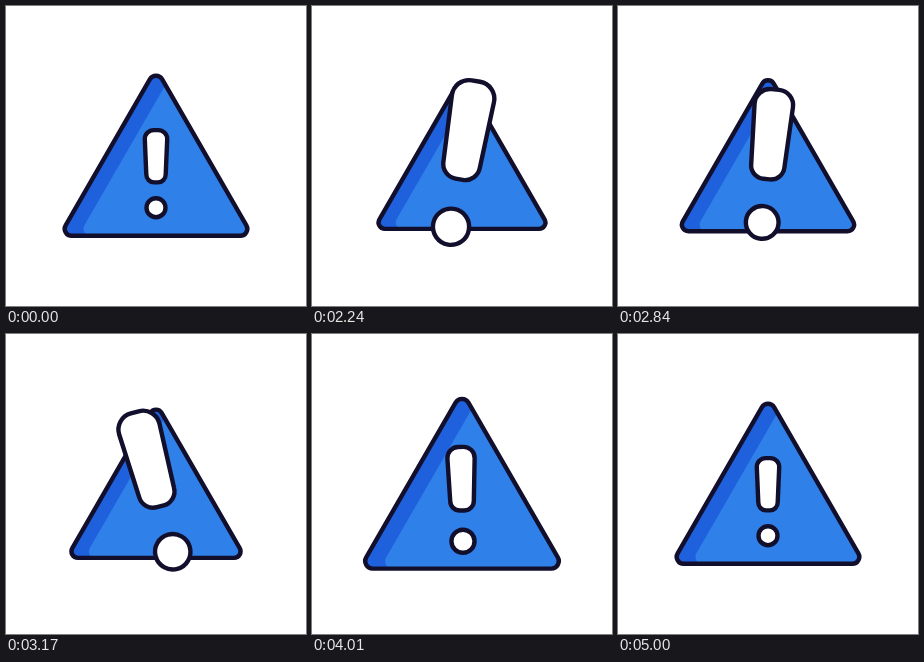
Write an HTML page that moves like this. It is 300 px wide and 300 px high and loops after 5.06 s.

```html
<!DOCTYPE html>
<html lang="en">
<head>
<meta charset="utf-8">
<title>Warning sign</title>
<style>
  html, body { margin: 0; width: 100%; height: 100%; overflow: hidden; background: #fff; }
  svg { display: block; width: 100vw; height: 100vh; }
  path, circle { vector-effect: non-scaling-stroke; }
  .line { stroke: #120f2d; stroke-width: 4.4; stroke-linejoin: round; }

  .sign, .mark {
    --ease: cubic-bezier(.37, 0, .63, 1);
    transform-origin: 0 0;
  }
  .sign { animation: pulse 5060ms var(--ease) infinite; }
  .mark {
    translate: 0 17.5px;
    animation: lift 5060ms var(--ease) infinite,
               swing 5060ms var(--ease) infinite,
               grow 5060ms var(--ease) infinite;
  }

  @keyframes pulse {
    0%, 39.53% { scale: 1; }
    48.02% { scale: .855; }
    57.9%  { scale: .95; }
    71.74% { scale: .86; }
    82.7%  { scale: 1.117; }
    89.72% { scale: .99; }
    98.81%, 100% { scale: 1; }
  }
  @keyframes lift {
    0%, 39.53% { translate: 0 17.5px; }
    47.63% { translate: 0 .3px; }
    57.9%  { translate: 0 8.4px; }
    71.74% { translate: 0 .5px; }
    82.7%  { translate: 0 20px; }
    87.55% { translate: 0 12.5px; }
    92.89% { translate: 0 18.5px; }
    98.81%, 100% { translate: 0 17.5px; }
  }
  @keyframes swing {
    0%, 39.53% { rotate: 0deg; }
    49.01% { rotate: 19.3deg; }
    66.8%, 71.74% { rotate: -20.2deg; }
    82.7%  { rotate: 4deg; }
    87.55% { rotate: 1.2deg; }
    92.89% { rotate: -.5deg; }
    98.81%, 100% { rotate: 0deg; }
  }
  @keyframes grow {
    0%, 39.53% { scale: 1; }
    47.63% { scale: 2.42; }
    57.9%  { scale: 1.67; }
    71.74% { scale: 2.4; }
    82.7%  { scale: .88; }
    87.55% { scale: 1.1; }
    92.89% { scale: .98; }
    98.81%, 100% { scale: 1; }
  }
</style>
</head>
<body>
<svg viewBox="0 0 300 300">
  <defs>
    <path id="tri" d="M-6.06-76.8A7 7 0 0 1 6.06-76.8L90.36 69.3A7 7 0 0 1 84.3 79.8H-84.3A7 7 0 0 1-90.36 69.3Z"/>
    <clipPath id="inside"><use href="#tri"/></clipPath>
  </defs>
  <g transform="translate(150 150)">
    <g class="sign">
      <use href="#tri" fill="#1f60dd"/>
      <g clip-path="url(#inside)"><use href="#tri" x="18.8" fill="#2f80e8"/></g>
      <use href="#tri" class="line" fill="none"/>
    </g>
    <g class="mark line" fill="#fff">
      <path d="M-2.2-43.4H2.2A9 9 0 0 1 11.2-34.1L9.7 1.1A7.8 7.8 0 0 1 1.9 8.9H-1.9A7.8 7.8 0 0 1-9.7 1.1L-11.2-34.1A9 9 0 0 1-2.2-43.4Z"/>
      <circle cy="34.2" r="9.5"/>
    </g>
  </g>
</svg>
</body>
</html>
```
